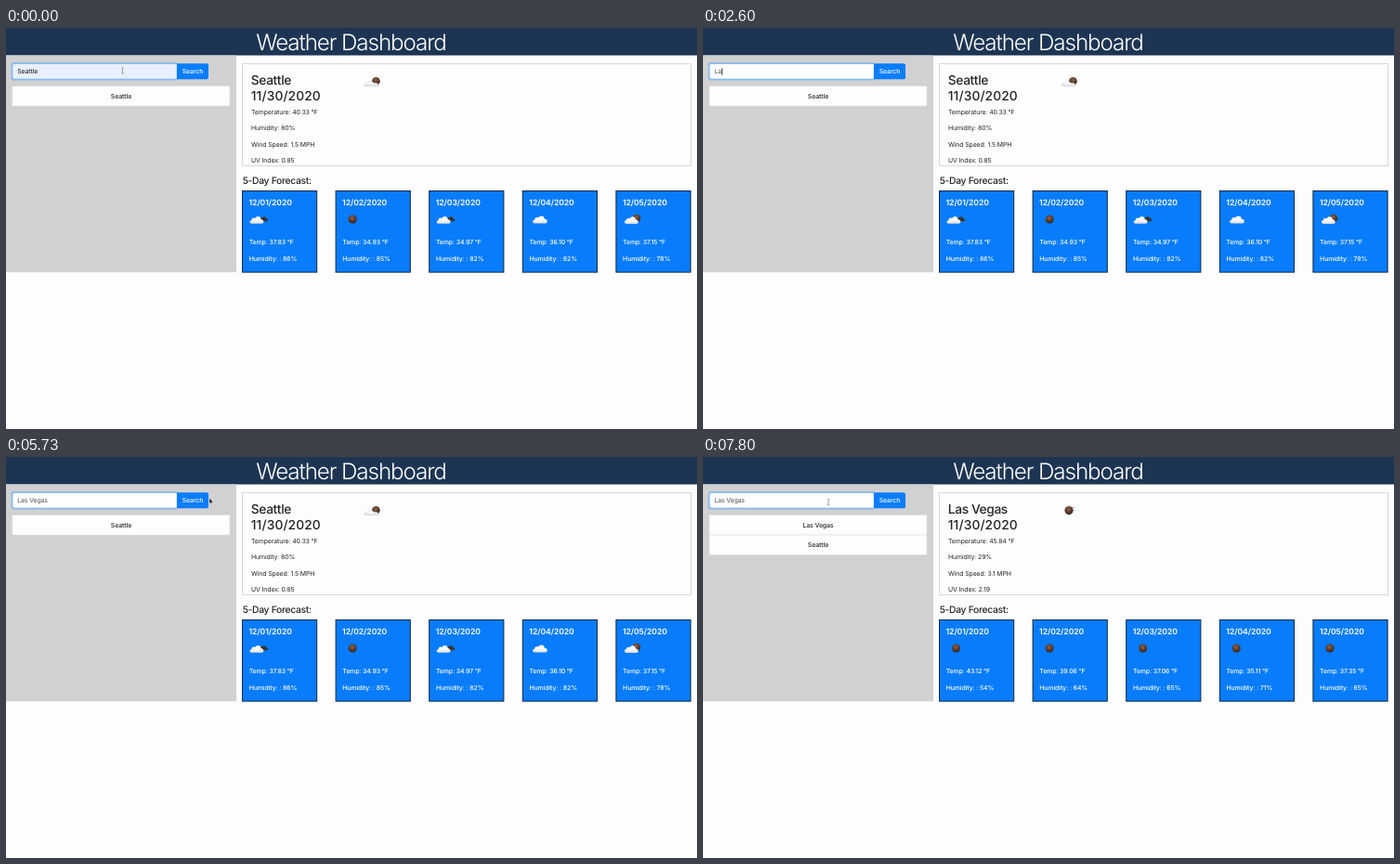
These frames come from a looping animation (744 px wide and 432 px high, 8 s). An HTML page:

```html
<!DOCTYPE html>
<html lang="en">
<head>
<meta charset="utf-8">
<title>Weather Dashboard</title>
<style>
  html, body { margin: 0; width: 100%; height: 100%; overflow: hidden; background: #fdfdfd; }
  svg { display: block; width: 744px; height: 432px; font-family: Inter, Roboto, sans-serif; }
  text { font-size: 6.9px; letter-spacing: -.09px; fill: #212529; white-space: pre; text-rendering: geometricPrecision; }
  .title { font-size: 24.2px; font-weight: 300; letter-spacing: -1.1px; fill: #fff; text-anchor: middle; }
  .city { font-size: 13.8px; font-weight: 500; letter-spacing: -.4px; }
  .today { font-size: 13.8px; font-weight: 500; letter-spacing: .1px; }
  .sub { font-size: 10.3px; font-weight: 500; letter-spacing: -.3px; }
  .mid { text-anchor: middle; }
  .card text { fill: #fff; font-weight: 500; }
  .card .day { font-size: 8.6px; font-weight: 600; letter-spacing: -.05px; }
  .btn { fill: #fff; font-weight: 500; }
</style>
</head>
<body>
<svg viewBox="0 0 744 432">
  <defs>
    <radialGradient id="brown" cx=".45" cy=".35" r=".65">
      <stop offset="0" stop-color="#8b6148"/><stop offset=".6" stop-color="#5a3a2a"/><stop offset="1" stop-color="#33231b"/>
    </radialGradient>
    <linearGradient id="white" x2="0" y2="1">
      <stop offset=".4" stop-color="#fff"/><stop offset="1" stop-color="#d9dde2"/>
    </linearGradient>
    <path id="puff" d="M-6.5 4.5C-9.3 4.5-9.3 .9-6.6 .8C-6.8-2-3.6-2.6-2.6-1.4C-1.4-4.8 4-4.2 4-.2C7.4-.6 8.2 4.5 5 4.5Z"/>
    <g id="moon"><circle r="4.5" fill="url(#brown)"/></g>
    <g id="cloud"><use href="#puff" fill="url(#white)"/></g>
    <g id="broken">
      <use href="#puff" transform="translate(5.2 -.6) scale(.62)" fill="#39352f"/>
      <use href="#puff" transform="translate(-1.8 .4) scale(.95)" fill="url(#white)"/>
    </g>
    <g id="few">
      <circle cx="4" cy="-1" r="4.3" fill="url(#brown)"/>
      <use href="#puff" transform="translate(-.8 .6) scale(.95)" fill="url(#white)"/>
    </g>
    <g id="fewFlat">
      <circle cx="4.4" cy="-.3" r="4.3" fill="url(#brown)"/>
      <path d="M-8 4.8C-8.6 2.6-6.5 1-4.4 1.6C-3-.6 1-.4 2.2 1.8C5 1 7.5 2.4 6.8 4.8Z" fill="url(#white)" stroke="#bbb" stroke-width=".4"/>
    </g>
    <g id="clear">
      <circle r="4.6" fill="url(#brown)"/>
      <circle cx="5.2" cy="-3" r=".7" fill="#6b5a50"/><circle cx="6.2" cy="-.4" r=".5" fill="#6b5a50"/>
    </g>
    <clipPath id="field"><rect x="7" y="38" width="177" height="18"/></clipPath>
  </defs>

  <rect width="744" height="29.5" fill="#1d3553"/>
  <text class="title" x="371.5" y="24">Weather Dashboard</text>
  <rect y="29.5" width="248" height="233.7" fill="#d1d1d1"/>

  <rect id="ring" x="5.6" y="37" width="179.6" height="19.4" rx="2.6" fill="#007bff" fill-opacity=".3"/>
  <path id="box" d="M184.2 38.5H9.2Q7 38.5 7 40.5V53Q7 55 9.2 55H184.2Z" stroke-width=".8"/>
  <g clip-path="url(#field)">
    <text id="query" x="12.2" y="49.3"></text>
    <rect id="caret" y="43.2" width=".8" height="7.4" fill="#222"/>
  </g>
  <rect id="btnRing" x="182.8" y="37" width="36.4" height="19.4" rx="2.6" fill="#007bff" fill-opacity=".45"/>
  <path id="btn" d="M184 38.3H216Q218 38.3 218 40.3V53.2Q218 55.2 216 55.2H184Z"/>
  <text class="btn mid" x="201" y="49.3">Search</text>

  <g id="list"></g>

  <rect x="254.5" y="38.5" width="483" height="110" fill="#fdfdfd" stroke="#d9d9d9"/>
  <text class="city" id="city" x="263.8" y="61.4"></text>
  <text class="today" x="263.8" y="78.2">11/30/2020</text>
  <use id="nowIcon"/>
  <text id="temp" x="264" y="92.5"></text>
  <text id="hum" x="264" y="110.2"></text>
  <text id="wind" x="264" y="127.8"></text>
  <text id="uv" x="264" y="145.4"></text>
  <text class="sub" x="254.7" y="167.7">5-Day Forecast:</text>
  <g id="cards"></g>

  <g id="beam" fill="none" stroke="#777" stroke-width=".7"><path d="M-1.2-3.2Q0-3.2 0-2.2V2.2Q0 3.2-1.2 3.2M1.2-3.2Q0-3.2 0-2.2M0 2.2Q0 3.2 1.2 3.2"/></g>
  <path id="arrow" d="M0-2.6V3L1.2 2L2 3.8L2.9 3.4L2.1 1.7L3.8 1.6Z" fill="#111" stroke="#fff" stroke-width=".3"/>
  <path id="hand" d="M-1-3.6Q-.3-4.2 .2-3.5V-1.2L2.6-.6Q3.4-.3 3.2.8L2.6 3.4H-.6L-2.6.6Q-2.5-.4-1.4.2L-1 .5Z" fill="#fff" stroke="#222" stroke-width=".6"/>
</svg>
<script>
const LOOP = 8000;
const $ = id => document.getElementById(id);
const show = (id, on) => $(id).setAttribute('visibility', on ? 'visible' : 'hidden');
const attr = (id, name, v) => $(id).setAttribute(name, v);
const put = (id, s) => { if ($(id).textContent !== s) $(id).textContent = s; };

const places = [
  { city: 'Seattle', temp: '40.33', hum: 80, wind: '1.5', uv: '0.85', icon: 'fewFlat',
    days: [['37.83', 86, 'broken'], ['34.93', 85, 'moon'], ['34.97', 82, 'broken'], ['36.10', 82, 'cloud'], ['37.15', 78, 'few']] },
  { city: 'Las Vegas', temp: '45.84', hum: 29, wind: '3.1', uv: '2.19', icon: 'clear',
    days: [['43.12', 54, 'moon'], ['39.06', 64, 'moon'], ['37.06', 65, 'moon'], ['35.11', 71, 'moon'], ['37.35', 65, 'moon']] }
];

const ERASE = [730, 1000, 1060, 1130, 1200, 1260, 1330];
const TYPE = [2260, 2460, 2730, 2930, 3200, 3400, 3600, 3800, 4130];
const CLICK = 6130, LOADED = 6460, FOCUS = 7200;

// pointer path: time, x, y
const path = [[0, 125.5, 46], [5200, 125.5, 46], [5600, 219, 47], [5800, 219, 47], [6060, 213.5, 48.5],
  [6700, 213.5, 48.5], [7060, 135, 48.5], [LOOP, 135, 48.5]];

function pointer(t) {
  const i = path.findIndex(p => p[0] > t);
  const [a, b] = [path[i - 1], path[i]];
  const u = (t - a[0]) / (b[0] - a[0]), e = u * u * (3 - 2 * u);
  return [a[1] + (b[1] - a[1]) * e, a[2] + (b[2] - a[2]) * e];
}

function drawList(names) {
  $('list').innerHTML = names.map((n, i) =>
    `<rect x="6.8" y="${62.5 + i * 21.5}" width="234.2" height="21.5" fill="#fdfdfd" stroke="#dcdcdc" stroke-width=".6"/>
     <text class="mid" x="124" y="${75.7 + i * 21.6}" font-weight="500">${n}</text>`).join('');
}

function drawCards(days) {
  $('cards').innerHTML = days.map(([temp, hum, icon], i) =>
    `<g class="card" transform="translate(${254.5 + i * 100.6} 0)">
      <rect y="175.5" width="80.2" height="87.6" fill="#087cfb" stroke="#12273f"/>
      <text class="day" x="7" y="190.6">12/0${i + 1}/2020</text>
      <use href="#${icon}" x="${icon === 'cloud' ? 19.5 : 18}" y="206"/>
      <text x="7.2" y="233">Temp: ${temp} °F</text>
      <text x="7.2" y="250.7">Humidity: : ${hum}%</text>
    </g>`).join('');
}

function drawNow(p) {
  put('city', p.city);
  put('temp', `Temperature: ${p.temp} °F`);
  put('hum', `Humidity: ${p.hum}%`);
  put('wind', `Wind Speed: ${p.wind} MPH`);
  attr('nowIcon', 'href', '#' + p.icon);
  attr('nowIcon', 'x', 394);
  attr('nowIcon', 'y', 57.6);
}

let now = -1, loaded = -1;
function draw(t) {
  const past = times => times.filter(k => k <= t).length;
  const typed = past(TYPE);
  const query = typed ? 'Las Vegas'.slice(0, typed) : 'Seattle'.slice(0, 7 - past(ERASE));
  put('query', query);

  const auto = t < ERASE[0];
  const focus = t < CLICK || t >= FOCUS;
  attr('query', 'style', `fill:${auto ? '#111' : '#495057'}`);
  attr('box', 'fill', auto ? '#e8f0fe' : '#fdfdfd');
  attr('box', 'stroke', focus ? '#80bdff' : '#ced4da');
  show('ring', focus);
  show('btnRing', !focus);

  const [x, y] = pointer(t);
  const over = x > 184 && x < 218;
  attr('btn', 'fill', over ? '#0069d9' : '#0a7dfd');

  // the caret restarts its blink at each key press
  const last = Math.max(...[200, ...ERASE, ...TYPE, FOCUS].filter(k => k <= t));
  show('caret', focus && t >= 200 && (t - last) % 1000 < 500);
  attr('caret', 'x', 12.4 + (query ? $('query').getComputedTextLength() : 0));

  const idle = t >= TYPE[0] && t < 5200;
  show('beam', !idle && x <= 184);
  show('hand', over);
  show('arrow', x >= 218);
  for (const id of ['beam', 'hand', 'arrow']) attr(id, 'transform', `translate(${x} ${y})`);

  const n = +(t >= CLICK), l = +(t >= LOADED);
  if (n !== now) {
    now = n;
    drawNow(places[n]);
    drawList(n ? ['Las Vegas', 'Seattle'] : ['Seattle']);
  }
  if (l !== loaded) {
    loaded = l;
    put('uv', `UV Index: ${places[l].uv}`);
    drawCards(places[l].days);
  }
}

const start = performance.now();
function tick() {
  draw((performance.now() - start) % LOOP);
  requestAnimationFrame(tick);
}
tick();
</script>
</body>
</html>
```
